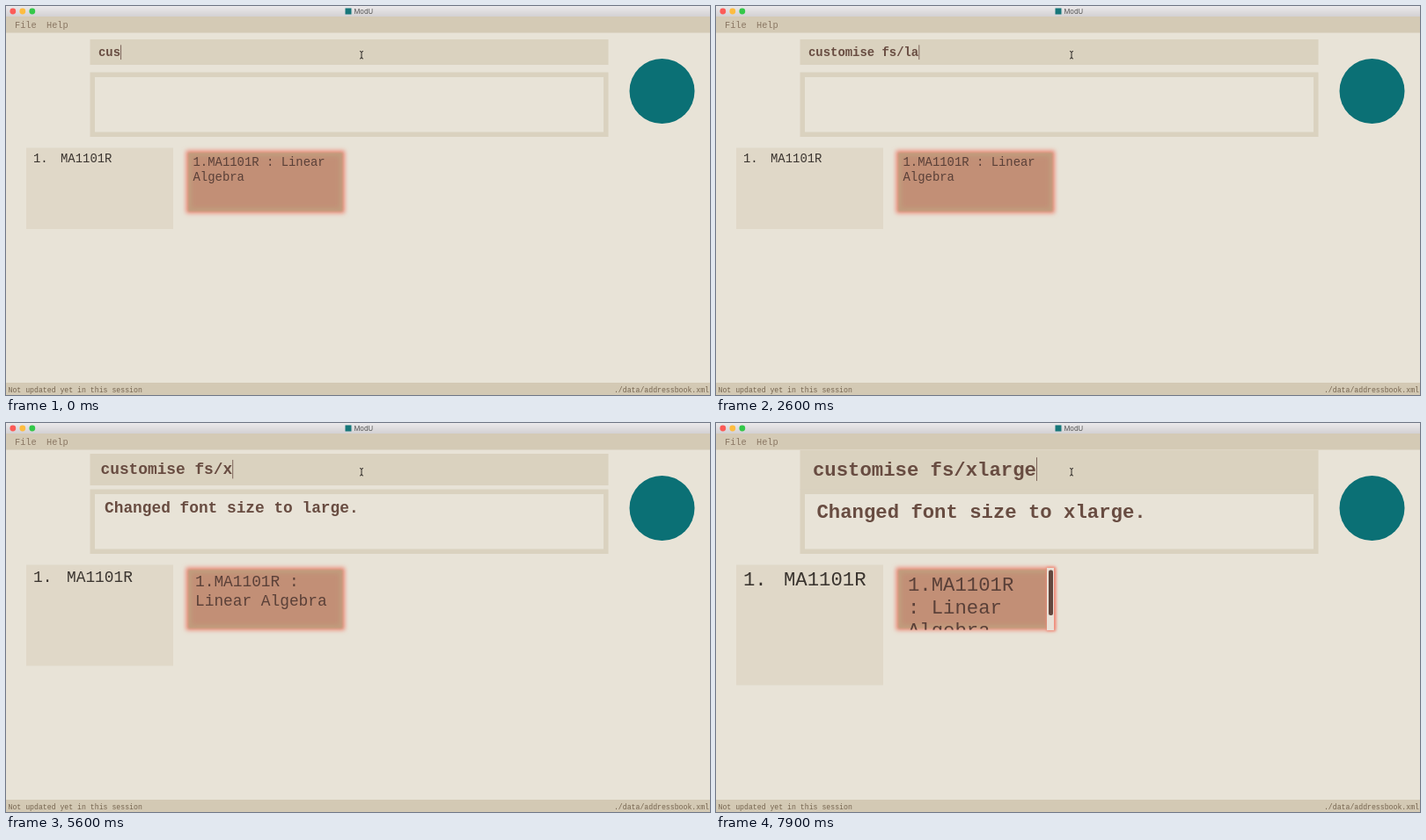
An HTML page that plays this animation: 800x443 px, repeating every 8 s.

```html
<!DOCTYPE html>
<html lang="en">
<head>
<meta charset="utf-8">
<title>ModU</title>
<style>
  html, body { margin: 0; width: 100%; height: 100%; overflow: hidden; background: #e8e3d7; }
  svg { display: block; width: 800px; height: 443px; }
  text { font-family: "Liberation Mono", "Courier New", monospace; white-space: pre; }
  .ui { fill: #8a7763; font-size: 10.3px; }
  .status { fill: #75644f; font-size: 8.2px; }
  .bold { fill: #684c41; font-weight: bold; }
  .list { fill: #3a342f; }
  .card { fill: #5a4038; }
</style>
</head>
<body>
<svg viewBox="0 0 800 443">
  <defs>
    <linearGradient id="bar" x2="0" y2="1">
      <stop stop-color="#ebe9eb"/><stop offset="1" stop-color="#d3d1d3"/>
    </linearGradient>
    <filter id="edge" x="-10%" y="-20%" width="120%" height="140%"><feGaussianBlur stdDeviation="1.1"/></filter>
    <filter id="glow" x="-10%" y="-20%" width="120%" height="140%"><feGaussianBlur stdDeviation="2.8"/></filter>
    <filter id="scrollGlow" x="-100%" y="-20%" width="300%" height="140%"><feGaussianBlur stdDeviation="1.6"/></filter>
    <clipPath id="cardClip"><rect x="206" y="165" width="170" height="70.5"/></clipPath>
  </defs>

  <rect width="800" height="443" fill="#e8e3d7"/>
  <rect y="12" width="800" height="18.5" fill="#d4cab5"/>
  <rect width="800" height="12" fill="url(#bar)"/>
  <circle cx="7.8" cy="6" r="3.4" fill="#fc5b57"/>
  <circle cx="18.8" cy="6" r="3.4" fill="#fdbc40"/>
  <circle cx="29.8" cy="6" r="3.4" fill="#34c84a"/>
  <rect x="385.5" y="2.5" width="7" height="7" fill="#17777a"/>
  <text x="395.5" y="8.8" fill="#555" style="font: 7.6px Inter, sans-serif">ModU</text>
  <text class="ui" x="10" y="25">File</text>
  <text class="ui" x="46" y="25">Help</text>

  <rect id="input" x="95.5" width="589" fill="#dad2bf"/>
  <rect x="95.5" y="75.5" width="589" height="73.5" fill="#dad2bf"/>
  <rect x="101" y="81" width="578" height="62.5" fill="#e8e3d7"/>
  <text id="command" class="bold"></text>
  <rect id="caret" width="1" fill="#7d655b"/>
  <text id="result" class="bold"></text>
  <path d="M402 51.5q2 0 2 1.5q0-1.5 2-1.5M404 53v6M402 60q2 0 2-1.5q0 1.5 2 1.5" fill="none" stroke="#2e2a27"/>

  <circle cx="745.5" cy="97" r="37" fill="#0b7075"/>

  <rect id="panel" x="23" y="161.5" width="167" fill="#e0d8c8"/>
  <text id="index" class="list" x="31">1.</text>
  <text id="code" class="list">MA1101R</text>

  <rect x="204.5" y="164.5" width="180.5" height="71.5" fill="#ec8a78" filter="url(#glow)"/>
  <rect x="207" y="167" width="175.5" height="67" fill="#c09d7d" filter="url(#edge)"/>
  <rect x="211" y="171" width="168" height="59" fill="#c28f76" filter="url(#glow)"/>
  <g id="lines" clip-path="url(#cardClip)"></g>
  <g id="scroll">
    <rect x="375.5" y="164" width="10.5" height="73" fill="#f08a78" filter="url(#scrollGlow)"/>
    <rect x="376" y="165" width="8" height="71" fill="#e9e1d7"/>
    <rect x="378" y="167.5" width="5" height="51.5" rx="2" fill="#62463d"/>
  </g>

  <rect y="429" width="800" height="14" fill="#d3c9b4"/>
  <text class="status" x="2.5" y="439.5">Not updated yet in this session</text>
  <text class="status" x="799" y="439.5" text-anchor="end">./data/addressbook.xml</text>
</svg>
<script>
const LOOP = 8000;
const $ = id => document.getElementById(id);

// Layout for each font size; every y is a text baseline.
const sizes = [
  { px: 13.92, top: 38, bottom: 67, cmd: [105, 57], code: 62, listY: 177.5,
    panel: 92.5, card: [212.5, 181.5, 17.5], lines: ["1.MA1101R : Linear", "Algebra"] },
  { px: 17.82, top: 35, bottom: 71, cmd: [107.5, 58], code: 69, listY: 181,
    panel: 115, card: [215, 186, 21.7], lines: ["1.MA1101R :", "Linear Algebra"],
    result: ["Changed font size to large.", 112, 102] },
  { px: 22.28, top: 31, bottom: 76, cmd: [110, 60], code: 77, listY: 184.5,
    panel: 137, card: [218, 190.5, 26.2], lines: ["1.MA1101R", ": Linear", "Algebra"],
    result: ["Changed font size to xlarge.", 114.5, 107.5] }
];
const ENTER = [3400, 7000];

// Key presses: time, first and last length of the prefix, and pace.
const first = "customise fs/large", second = "customise fs/xlarge";
const runs = [
  [0, first, 3, 10, 130],
  [1600, first, 11, 13, 200],
  [2400, first, 14, 18, 150],
  [4700, first, 17, 13, 120],
  [5500, second, 14, 14, 100],
  [5800, second, 15, 19, 150]
];

function typed(t) {
  const [start, text, from, to, pace] = runs.findLast(r => r[0] <= t);
  const steps = Math.min(Math.abs(to - from), Math.floor((t - start) / pace));
  return text.slice(0, from + Math.sign(to - from) * steps);
}

function set(id, attrs) {
  for (const name in attrs) $(id).setAttribute(name, attrs[name]);
}

function draw(t) {
  const s = sizes[ENTER.filter(time => time <= t).length];
  const px = s.px, [x, y] = s.cmd, command = typed(t);
  const [message, rx, ry] = s.result || ["", 0, 0];
  const [cx, cy, leading] = s.card;

  set("input", { y: s.top, height: s.bottom - s.top });
  set("command", { x, y, "font-size": px });
  $("command").textContent = command;
  set("caret", {
    x: x + command.length * px * 0.6, y: 53 - px * 0.62, height: px * 1.2,
    opacity: (t + 430) % 1000 < 500 ? 1 : 0
  });
  set("result", { x: rx, y: ry, "font-size": px });
  $("result").textContent = message;
  set("panel", { height: s.panel });
  set("index", { y: s.listY, "font-size": px });
  set("code", { x: s.code, y: s.listY, "font-size": px });
  $("lines").innerHTML = s.lines.map((line, i) =>
    `<text class="card" x="${cx}" y="${cy + i * leading}" font-size="${px}">${line}</text>`).join("");
  set("scroll", { opacity: s === sizes[2] ? 1 : 0 });
}

const begin = performance.now();
function tick() {
  const t = (performance.now() - begin) % LOOP;
  draw(Math.floor(t / 100) * 100);
  requestAnimationFrame(tick);
}
tick();
</script>
</body>
</html>
```
